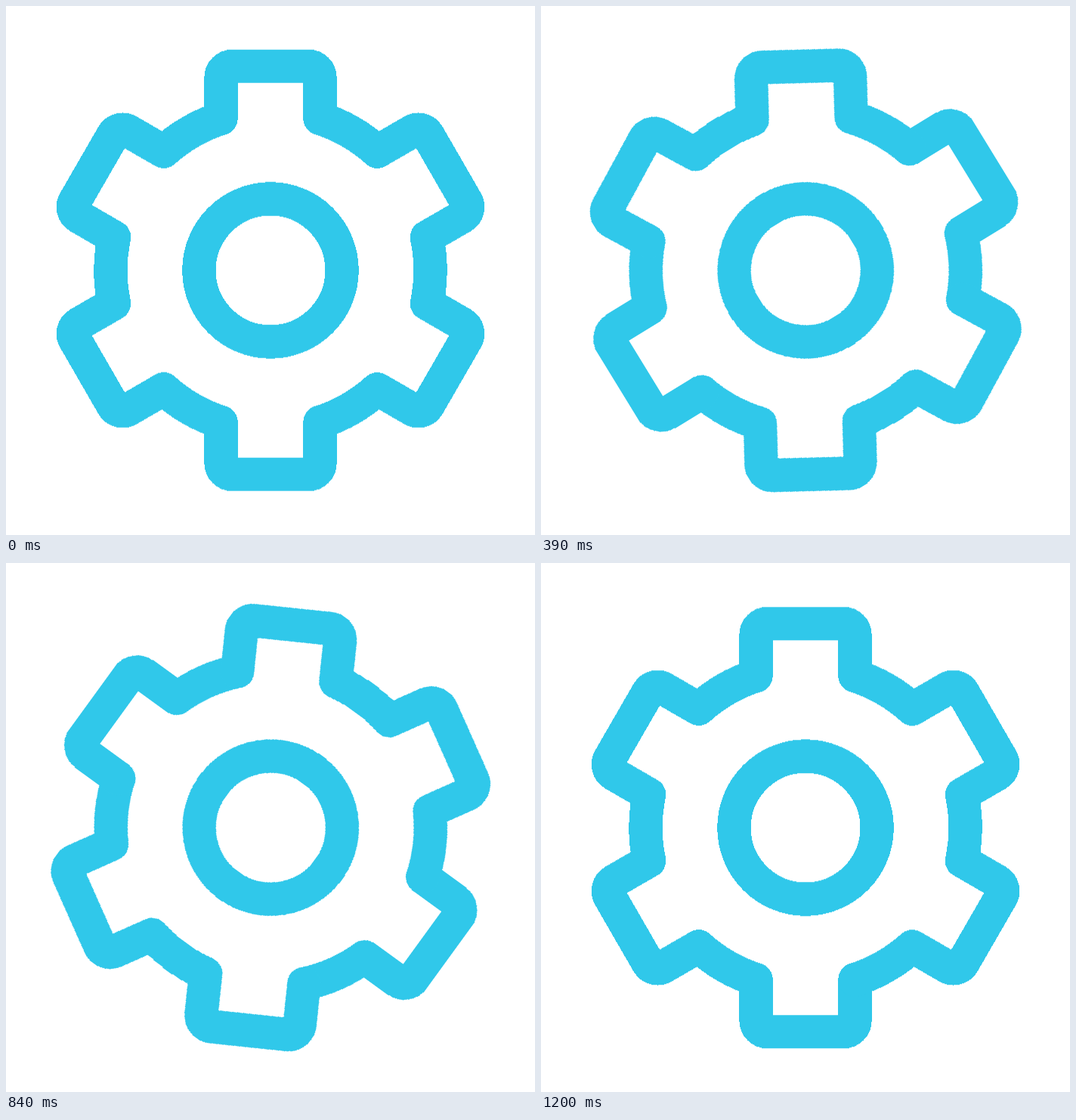
An HTML page for the animation above (2730 ms loop, 700 by 700 pixels).

```html
<!DOCTYPE html>
<html lang="en">
<head>
<meta charset="utf-8">
<title>Turning gear</title>
<style>
  html, body {
    margin: 0;
    width: 100%;
    height: 100%;
    overflow: hidden;
    background: #fff;
  }
  svg {
    display: block;
    width: 100vw;
    height: 100vh;
  }
  .gear {
    fill: none;
    stroke: #30c8ea;
    stroke-width: 44.4;
    stroke-linecap: round;
    stroke-linejoin: round;
    shape-rendering: crispEdges;
    animation: turn 2730ms infinite;
  }
  /* half a turn in 40 ticks of 30 ms, then rest */
  @keyframes turn {
    0% { transform: rotate(0deg); animation-timing-function: steps(40, end); }
    43.956%, 100% { transform: rotate(180deg); }
  }
</style>
</head>
<body>
<svg viewBox="-350 -350 700 700">
  <defs>
    <!-- one tooth and the rim up to the next -->
    <path id="tooth" d="M-65.5 -201.1V-255a15 15 0 0 1 15 -15H50.5a15 15 0 0 1 15 15V-201.1A211.5 211.5 0 0 1 141.4 -157.3"/>
  </defs>
  <g class="gear">
    <g transform="translate(0 -.3)">
      <use href="#tooth"/>
      <use href="#tooth" transform="rotate(60)"/>
      <use href="#tooth" transform="rotate(120)"/>
      <use href="#tooth" transform="rotate(180)"/>
      <use href="#tooth" transform="rotate(240)"/>
      <use href="#tooth" transform="rotate(300)"/>
      <circle r="94.6"/>
    </g>
  </g>
</svg>
</body>
</html>
```
